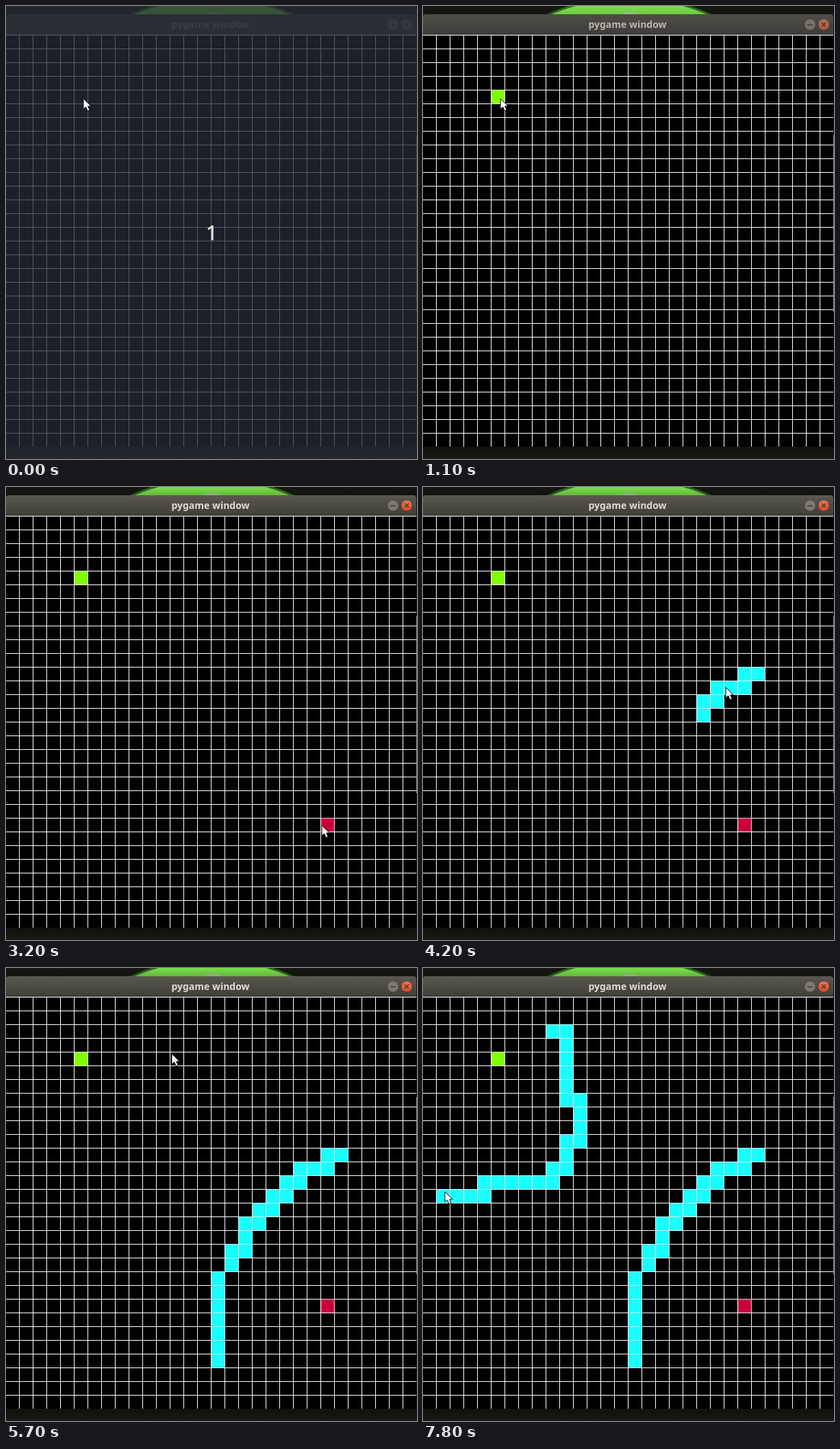
Animation of 600x660 px, one loop 8 s. Source, as an HTML page:

```html
<!DOCTYPE html>
<html lang="en">
<head>
<meta charset="utf-8">
<title>pygame window</title>
<style>
html, body { margin: 0; width: 100%; height: 100%; overflow: hidden; background: #14150f; }
svg { display: block; width: 600px; height: 660px; }
text { font-family: "Noto Sans", "Open Sans", sans-serif; text-anchor: middle; }
</style>
</head>
<body>
<svg viewBox="0 0 600 660">
  <defs>
    <linearGradient id="bar" x2="0" y2="1">
      <stop offset="0" stop-color="#5a594f"/><stop offset="1" stop-color="#3e3d38"/>
    </linearGradient>
    <linearGradient id="floor" x2="0" y2="1">
      <stop offset="0" stop-color="#0f100c"/><stop offset="1" stop-color="#191a14"/>
    </linearGradient>
    <linearGradient id="shade" x2="0" y2="1">
      <stop offset="0" stop-opacity="0"/><stop offset="1" stop-opacity=".18"/>
    </linearGradient>
    <linearGradient id="red" x2="0" y2="1">
      <stop offset="0" stop-color="#f2764f"/><stop offset="1" stop-color="#dc4a25"/>
    </linearGradient>
  </defs>

  <rect width="600" height="660" fill="#151712"/>
  <circle cx="301" cy="285" r="297" fill="#7adf4b" stroke="#2f6a1c" stroke-width="3"/>
  <ellipse cx="302" cy="13" rx="14" ry="4" fill="#a9cf95"/>
  <rect id="shadow" width="600" height="12" fill="url(#shade)"/>
  <rect y="642" width="600" height="18" fill="url(#floor)"/>

  <path d="M0 42V16Q0 12 5 12H594Q599 12 599 17V42Z" fill="#3c3b37"/>
  <path id="lit" d="M0 42V16Q0 12 5 12H594Q599 12 599 17V42Z" fill="url(#bar)"/>
  <text id="name" x="298.5" y="32" font-size="14" font-weight="700">pygame window</text>
  <g fill="#69685f">
    <circle cx="565" cy="27" r="8"/><circle cx="585" cy="27" r="8"/>
  </g>
  <g id="hot" stroke="#45443c" stroke-width=".8">
    <circle cx="565" cy="27" r="8" fill="#7d7b70"/>
    <circle cx="585" cy="27" r="8" fill="url(#red)"/>
  </g>
  <path d="M561 27.5h8M582 24l6 6M588 24l-6 6" stroke="#3a3934" stroke-width="1.3"/>

  <g shape-rendering="crispEdges">
    <rect y="42" width="599" height="600"/>
    <rect x="599" y="42" width="1" height="600" fill="#14150f"/>
    <rect x="599" y="188" width="1" height="258" fill="#a0a098"/>
    <path id="grid" fill="#fff"/>
    <g id="cells"></g>
  </g>

  <g id="veil">
    <rect width="600" height="660" fill="#262a34" opacity=".77"/>
    <text x="300.5" y="341" font-size="29.5" fill="#dededa" stroke="#dededa" stroke-width=".6">1</text>
  </g>
  <path id="cursor" d="M0 0V15.2L3.6 12L6.2 17.8L9.1 16.5L6.6 11H11.2Z" fill="#fff" stroke="#111"/>
</svg>
<script>
const LOOP = 8000, STEP = 100, CELL = 20, TOP = 42;
const $ = id => document.getElementById(id);
const clamp = v => Math.min(1, Math.max(0, v));
const smooth = u => u * u * (3 - 2 * u);

// Pointer moves: first step, last step, destination
const home = [113, 135];
const legs = [
  [14, 18, 449, 395], [18, 20, 461, 447], [21, 25, 461, 483], [26, 28, 461, 493],
  [34, 37, 469, 284], [38, 39, 484, 270], [39, 42, 442, 292], [42, 47, 307, 465],
  [47, 50, 304, 575], [50, 57, 242, 125], [57, 60, 190, 91], [62, 65, 206, 177],
  [65, 67, 213, 269], [67, 73, 95, 313], [74, 78, 32, 326]
];

// Painted strokes: first cell, moves from it, steps they take, power of the easing
const dirs = { L: [-1, 0], R: [1, 0], D: [0, 1], Z: [-1, 1] };
const strokes = [
  { fill: '#80ff00', at: [5, 4], moves: '', from: 11, to: 12, pow: 1 },
  { fill: '#c80039', at: [23, 22], moves: '', from: 32, to: 33, pow: 1 },
  { fill: '#18ffff', at: [24, 11], moves: 'LDLLDLDLDLDLDDLDZDDDDDD', from: 39, to: 49, pow: 1 },
  { fill: '#18ffff', at: [9, 2], moves: 'RDDDDDRDDDLDD', from: 61, to: 67, pow: 2.5 },
  { fill: '#18ffff', at: [9, 12], moves: 'DLLLLL', from: 68, to: 73, pow: 1 },
  { fill: '#18ffff', at: [4, 14], moves: 'LLL', from: 75, to: 78, pow: 1 }
];

function add(parent, tag, attrs) {
  const el = document.createElementNS('http://www.w3.org/2000/svg', tag);
  for (const k in attrs) el.setAttribute(k, attrs[k]);
  return parent.appendChild(el);
}

// A cell tints the grid lines on its top and right and pales just inside them
function addCell(col, row, fill) {
  const x = col * CELL, y = TOP + row * CELL, g = add($('cells'), 'g', {});
  add(g, 'rect', { x, y, width: CELL, height: CELL, fill });
  add(g, 'path', { d: `M${x} ${y}h20v20h-1v-19h-19z`, fill: '#fff', opacity: 0.65 });
  add(g, 'path', { d: `M${x} ${y + 1}h19v19h-1v-18h-17v18h-1z`, fill: '#b3b3b3', opacity: 0.3 });
  return g;
}

function pointerAt(step) {
  let [x, y] = home;
  for (const [from, to, tx, ty] of legs) {
    const u = smooth(clamp((step - from) / (to - from)));
    x += (tx - x) * u;
    y += (ty - y) * u;
  }
  return [Math.round(x), Math.round(y)];
}

function paintedCount({ from, to, pow, moves }, step) {
  if (step < from) return 0;
  return 1 + Math.ceil(moves.length * clamp((step - from) / (to - from)) ** pow);
}

let lines = '';
for (let i = 0; i < 30; i++) {
  lines += `M0 ${TOP + i * CELL}h599v1h-599z`;
  if (i < 29) lines += `M${i * CELL + 19} ${TOP}h1v600h-1z`;
}
$('grid').setAttribute('d', lines);

for (const s of strokes) {
  let [col, row] = s.at;
  s.cells = [addCell(col, row, s.fill)];
  for (const m of s.moves) {
    col += dirs[m][0];
    row += dirs[m][1];
    s.cells.push(addCell(col, row, s.fill));
  }
}

function draw(ms) {
  const step = Math.floor(ms % LOOP / STEP);
  const focus = step < 11 ? 0 : step < 12 ? 0.6 : 1;
  const mix = (a, b) => Math.round(a + (b - a) * focus);

  $('veil').style.display = step < 1 ? '' : 'none';
  for (const id of ['lit', 'hot', 'shadow']) $(id).setAttribute('opacity', focus);
  $('name').setAttribute('fill', `rgb(${mix(128, 223)},${mix(125, 219)},${mix(120, 210)})`);

  for (const s of strokes) {
    const n = paintedCount(s, step);
    s.cells.forEach((c, i) => { c.style.display = i < n ? '' : 'none'; });
  }
  $('cursor').setAttribute('transform', `translate(${pointerAt(step)})`);
}

const start = performance.now();
function tick() {
  draw(performance.now() - start);
  requestAnimationFrame(tick);
}
tick();
</script>
</body>
</html>
```
